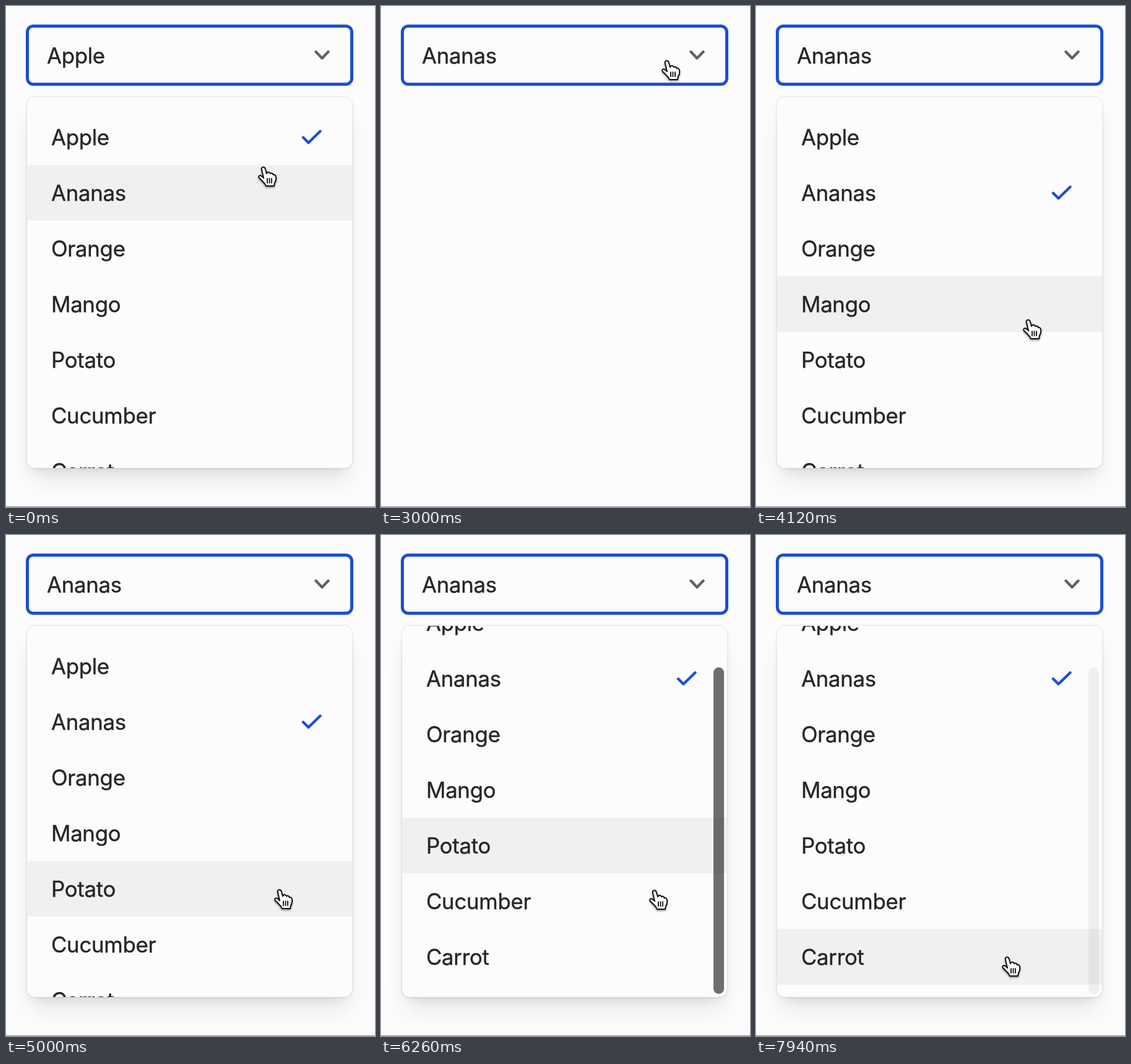
Recreate the animation shown at these times as an HTML page. Size 596 by 810 pixels, loop 8 s.

```html
<!DOCTYPE html>
<html lang="en">
<head>
<meta charset="utf-8">
<title>Select menu</title>
<style>
  html, body { margin: 0; width: 100%; height: 100%; overflow: hidden; background: #fcfcfc; }
  #stage {
    position: relative; width: 596px; height: 810px; overflow: hidden;
    font: 400 34.8px/90px Inter, Roboto, sans-serif; letter-spacing: -.3px; color: #262626;
    -webkit-text-stroke: .4px #262626;
  }
  #stage * { box-sizing: border-box; }
  #stage > *, .row, .bar, .list { position: absolute; }
  svg { overflow: visible; }
  .field {
    left: 34px; top: 32px; width: 525px; height: 95px;
    border: 2.5px solid #d2d2d2; border-radius: 9px;
  }
  .field.focus { left: 32px; top: 30px; width: 529px; height: 99px; border: 5px solid #1d4fd2; border-radius: 12px; }
  .value { left: 66px; top: 35px; }
  .icons { left: 0; top: 0; }
  .line { fill: none; stroke-width: 4.4; stroke-linecap: round; stroke-linejoin: round; }
  .panel {
    left: 34px; top: 147px; width: 525px; height: 600px; border-radius: 13px;
    background: #fcfcfc;
    box-shadow: 0 0 0 2px rgba(0, 0, 0, .05), 0 25px 38px -8px rgba(0, 0, 0, .1),
      0 10px 15px -5px rgba(0, 0, 0, .06);
  }
  .clip { position: absolute; inset: 0; overflow: hidden; border-radius: 13px; }
  .list { left: 0; top: 20px; width: 100%; }
  .row { left: 0; width: 100%; height: 90px; padding-left: 39px; }
  .row.hover { background: #f0f0f0; }
  .check { position: absolute; left: 0; top: 0; }
  .bar { left: 503px; width: 17px; height: 528px; border-radius: 9px; background: #000; }
  .pointer { left: 0; top: 0; filter: drop-shadow(0 2px 1.5px rgba(0, 0, 0, .4)); }
  .base { left: 0; top: 809px; width: 596px; height: 1px; background: #858585; }
</style>
</head>
<body>
<div id="stage">
  <div class="field"></div>
  <div class="value"></div>
  <svg class="icons" width="596" height="130">
    <path class="line" stroke="#626262" d="M500.5 74l10 10.5 10-10.5"/>
  </svg>
  <div class="panel">
    <div class="clip">
      <div class="list">
        <svg class="check" width="525" height="90">
          <path class="line" stroke="#1d4fd2" d="M446 45.500l8.500 8.500 19-18.500"/>
        </svg>
      </div>
      <div class="bar"></div>
    </div>
  </div>
  <div class="base"></div>
  <svg class="pointer" width="40" height="40">
    <g id="hand" transform="translate(-8 -1)" stroke="#111" stroke-linecap="round" stroke-linejoin="round">
      <path fill="#fff" stroke-width="2" d="M9 19L6 6Q5 2 8 1.500 11 1 12 5L14 12Q15 9 17.500 9.500 19.500 10 20 12 23 10 25 14 28 13 29 17 30 22 27 27L26 32H13Q12 29 8 25L2 19Q0 16 3 15 5 14.500 9 19Z"/>
      <path fill="none" stroke-width="1.800" d="M15 20v7M18.500 20v7M22 20v7"/>
    </g>
    <path id="arrow" fill="#000" stroke="#fff" stroke-width="2" d="M0 0V28L6 22.500 10.500 33 15.500 31 11 20.500H19Z"/>
  </svg>
</div>
<script>
const LOOP = 8000;
const FRUITS = ['Apple', 'Ananas', 'Orange', 'Mango', 'Potato', 'Cucumber', 'Carrot'];
const ROW = 90;

// Each track is a list of [time, ...values].
const POINTER = [
  [400, 415, 260], [800, 426, 282], [1250, 431, 280], [1460, 432, 210],
  [2000, 459, 96], [2300, 461, 88], [3200, 461, 88], [3700, 444, 330],
  [4120, 439, 507], [4650, 440, 516], [4950, 441, 573], [6260, 441, 574],
  [6850, 441, 576], [7700, 405, 682]
];
const OPACITY = [[1300, 1], [1420, 0], [3040, 0], [3120, 1]];
const SCROLL = [[5560, 0], [6100, 70]];
const BAR = [[5540, 0], [5640, .56], [7640, .56], [7980, .03]];
const FOCUS = [[0, 1], [1400, 0], [2640, 1]];

const $ = selector => document.querySelector(selector);
const field = $('.field'), value = $('.value'), panel = $('.panel'), list = $('.list');
const check = $('.check'), bar = $('.bar'), pointer = $('.pointer');

const rows = FRUITS.map((name, i) => {
  const row = document.createElement('div');
  row.className = 'row';
  row.textContent = name;
  row.style.top = i * ROW + 'px';
  list.insertBefore(row, check);
  return row;
});

const smooth = k => k * k * (3 - 2 * k);

function sample(track, t) {
  const next = track.findIndex(key => key[0] > t);
  if (next === 0) return track[0].slice(1);
  if (next < 0) return track[track.length - 1].slice(1);
  const a = track[next - 1], b = track[next];
  const k = smooth((t - a[0]) / (b[0] - a[0]));
  return a.slice(1).map((v, i) => v + (b[i + 1] - v) * k);
}

const step = (track, t) => track.filter(key => key[0] <= t).pop()[1];

// Scrolling alone leaves the highlight on the row hovered before it.
function hoveredRow(t, y, scroll) {
  if (t < 3400) return 1;
  if (t >= SCROLL[0][0] && t < 6500) return 4;
  return Math.floor((y - 167 + scroll) / ROW);
}

function draw(t) {
  const [x, y] = sample(POINTER, t);
  const [opacity] = sample(OPACITY, t);
  const [scroll] = sample(SCROLL, t);
  const selected = t < 1300 ? 0 : 1;
  const hovered = hoveredRow(t, y, scroll);
  const hand = opacity > 0 || y < 127;

  field.classList.toggle('focus', step(FOCUS, t) === 1);
  value.textContent = FRUITS[selected];
  panel.style.opacity = opacity;
  list.style.transform = `translateY(${-scroll}px)`;
  check.style.top = selected * ROW + 'px';
  rows.forEach((row, i) => row.classList.toggle('hover', i === hovered));
  bar.style.top = 5 + scroll * 62 / 70 + 'px';
  bar.style.opacity = sample(BAR, t)[0];
  pointer.style.transform = `translate(${x}px, ${y}px)`;
  $('#hand').style.display = hand ? '' : 'none';
  $('#arrow').style.display = hand ? 'none' : '';
}

const start = performance.now();
function tick() {
  draw((performance.now() - start) % LOOP);
  requestAnimationFrame(tick);
}
tick();
</script>
</body>
</html>
```
